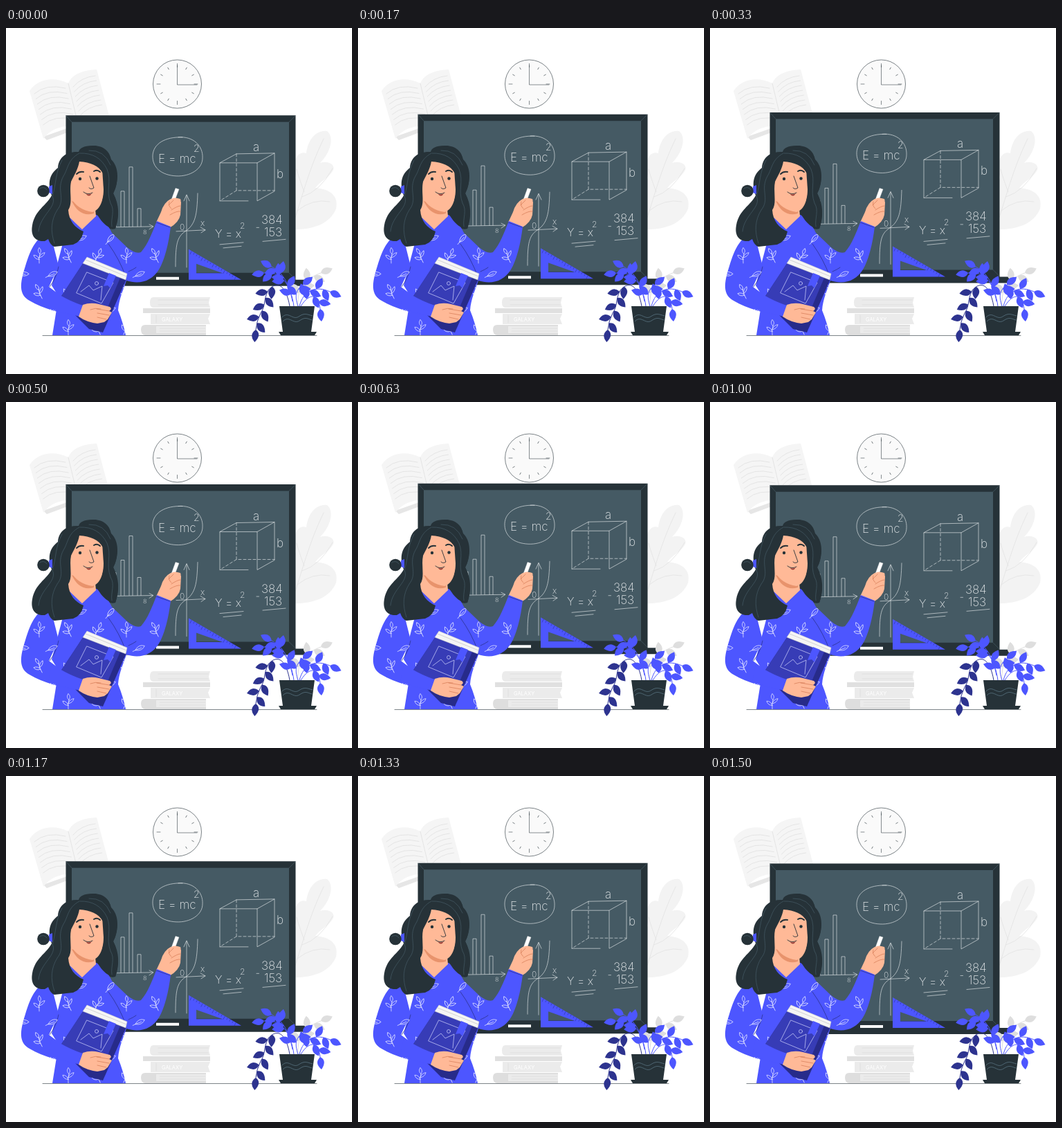
Recreate the animation shown at these times as an HTML page. Size 500 by 500 pixels, loop 1540 ms.

```html
<!DOCTYPE html>
<html lang="en">
<head>
<meta charset="utf-8">
<title>Teacher at the blackboard</title>
<style>
html, body { margin: 0; width: 100%; height: 100%; overflow: hidden; background: #fff; }
svg { display: block; width: 100vw; height: 100vh; }
.line { fill: none; stroke-linecap: round; stroke-linejoin: round; }
.ink { stroke: #263238; }
.chalk { stroke: #e4e8ea; stroke-width: .65; }
.note { font: 200 17px Inter, Roboto, sans-serif; fill: #e4e8ea; }
.small { font-size: 12px; }
.dark { fill: #263238; }
.blue { fill: #4d56ff; }
.skin { fill: #ffb997; }
.crease { stroke: #d9805c; stroke-width: .8; }
</style>
</head>
<body>
<svg viewBox="0 0 500 500">
  <defs>
    <path id="leaf" d="M0 0Q7-11 20 0Q9 11 0 0Z"/>
    <path id="sprig" d="M0 11Q-1 2 1-4M0 5Q-7 5-9-2Q-2-2 0 5M0 2Q7 1 9-6Q2-5 0 2M1-4Q-4-8 0-14Q5-9 1-4"/>
    <path id="bud" d="M-8 3Q-3-7 7-4Q3 5-8 3L-12 5M-8 3L2-1"/>
    <path id="dress" d="M91 272L131 270C143 279 149 287 153 296L175 317Q187 327 195 324C205 313 211 296 218 279L238 287C235 312 229 336 221 349C211 366 193 371 174 365C170 377 163 392 162 408Q169 425 173 444H67L76 388L66 372L85 300Z"/>
    <path id="sleeve" d="M64 296C44 301 36 318 28 344C20 369 18 385 34 394C54 406 80 412 106 417L111 401C96 396 83 391 78 386L62 374L76 344Z"/>
    <clipPath id="cloth"><use href="#dress"/><use href="#sleeve"/></clipPath>
  </defs>

  <!-- wall -->
  <g class="line" stroke="#e3e3e3" stroke-width=".9">
    <path fill="#e6e6e6" stroke="none" d="M54 157L88 145L104 138L149 127L146 133L105 145L59 162Z"/>
    <path fill="#f5f5f5" stroke="none" d="M34 91C46 73 70 70 90 80C96 66 112 61 131 60L149 127C130 124 114 130 105 143C90 139 66 143 54 160Z"/>
    <path d="M90 80L105 143"/>
    <g id="pageLines"></g>
  </g>
  <path fill="#f3f3f3" d="M412 291C416 270 412 240 419 216C413 192 421 177 434 181C436 163 447 147 464 149C475 158 469 180 454 195C465 191 476 197 473 205C468 216 454 221 447 231C461 232 482 238 477 261C468 284 442 292 412 291Z"/>
  <path class="line" stroke="#e2e2e2" stroke-width=".8" d="M414 286C428 245 437 205 459 160M431 237Q423 216 420 204M428 244Q454 236 472 203M421 264Q443 246 468 251"/>
  <circle cx="247.500" cy="81" r="35" fill="#fafafa" class="ink" stroke-width=".6"/>
  <g id="ticks" class="line ink" stroke-width=".55"><path d="M247.500 54V82H276"/></g>

  <g id="board">
    <path class="dark" d="M86.500 126.500H418.500V364H437V373H86.500Z"/>
    <path fill="#455a64" d="M95 136H409V354H95Z"/>
    <path class="line" stroke="#455a64" stroke-width=".7" d="M87 127L95 136M418 127L409 136M418 363L409 354"/>
    <g class="line chalk">
      <path d="M249 158C271 156 285 171 284 188C284 204 266 215 246 214C225 213 211 202 212 184C213 168 229 157 255 158"/>
      <path d="M150 288L212 287M207 284L213 287L207 291"/>
      <g id="bars"></g>
      <path d="M261 346V242M257 250L261 241L265 250M246 294L288 292M281 288L288 292L282 296M245 345C245 313 247 302 259 294C274 284 276 270 277 239"/>
      <path d="M350 250H309V195H363V250L388 236V181L333 182L309 195M363 195L388 181"/>
      <path stroke-dasharray="4 3" d="M333 182V235H388M333 235L309 250"/>
      <path d="M309 313L343 310M314 318L340 315.500M371 308.500L404 305.500M362 288.500H365.500"/>
    </g>
    <g class="note">
      <text x="220" y="195">E = mc</text><text class="small" x="271" y="179" style="font-size:14px">2</text>
      <text x="302" y="303" style="font-size:16px">Y = x</text><text class="small" x="338" y="290">2</text>
      <text x="369" y="283">384</text><text x="373" y="301">153</text>
      <text x="357" y="178">a</text><text x="391" y="217">b</text>
      <text class="small" x="281" y="286">x</text><text class="small" x="251" y="292">0</text>
      <text x="198" y="298" style="font-size:9px">8</text>
    </g>
    <path fill="#fff" d="M217 360H250V364H217Z"/>
    <path class="blue" fill-rule="evenodd" d="M264 320L340 364H264ZM275 341V354.500H313Z"/>
    <g id="rulerMarks" class="line" stroke="#2b3197" stroke-width=".6"></g>
  </g>

  <!-- stacked books -->
  <g fill="#ebebeb">
    <path d="M213 389H295L293 397L295 404H213Q208 404 208 397Q208 389 213 389Z"/>
    <path fill="#e0e0e0" d="M198 405H295V412H198Z"/>
    <path d="M209 413H295L292 420L295 428H209Z"/>
    <path fill="#dedede" d="M201 429H289V444H201Q195 443 195 436Q195 429 201 429Z"/>
    <path fill="#ebebeb" d="M217 431H289V441H217Z"/>
    <path class="line" stroke="#dfdfdf" d="M220 393H292M220 400H292M217 415V426M222 434H288M222 438H288"/>
    <text x="225" y="424" fill="#fff" font-family="Inter, sans-serif" font-size="7.500">GALAXY</text>
  </g>
  <path class="line ink" stroke-width=".6" d="M53 444.500H449"/>

  <g id="plant"></g>
  <path class="dark" d="M395 402H446L441 439H449L446 444H397L394 439H400Z"/>
  <path class="line" stroke="#607d8b" stroke-width=".7" d="M399 418C408 408 414 423 423 417S435 414 443 416M400 424C409 414 415 429 424 423S435 420 442 422"/>

  <!-- teacher -->
  <path class="dark" d="M109 174C130 165 149 174 152 190C164 202 163 222 155 239C164 255 164 274 158 290Q150 293 142 284L120 265L96 230Z"/>
  <path class="skin" d="M217 281L224 266Q228 252 238 247Q244 244 250 247L253 252L252 270Q250 281 236 289Z"/>
  <path fill="#fff" stroke="#ddd" stroke-width=".4" d="M245 231.500L250 233L244 249L239 248Z"/>
  <path class="skin" d="M235 251Q241 244 247 246L252 247Q254 252 250 255L236 260Z"/>
  <path class="line crease" d="M235 256L242 249M239 263Q248 257 252 257M237 270Q247 264 252 265M236 251Q234 257 239 261"/>
  <use href="#dress" class="blue"/>
  <use href="#sleeve" class="blue"/>
  <path class="line" stroke="#2d338f" stroke-width=".8" d="M148 312Q164 334 173 359M76 345Q73 361 63 374M217 281L237 288M177 352Q184 349 188 346"/>
  <g id="print" class="line" stroke="#dfe1ff" stroke-width=".9" clip-path="url(#cloth)"></g>
  <path class="skin" d="M88 240V270L110 291L130 272L128 250Z"/>
  <path fill="#e8936c" d="M95 250Q106 274 127 268L127 262Z"/>
  <path class="skin" d="M108 186C98 200 90 224 93 243C99 257 111 264 125 266C137 262 141 247 141 233L139 204Q126 190 108 186Z"/>
  <circle class="dark" cx="107" cy="218" r="2.200"/><circle class="dark" cx="131.500" cy="217.500" r="2.200"/>
  <path class="line ink" stroke-width="1.900" d="M102 211Q106 207 112 208M127 207Q132 204 136 208"/>
  <path class="line ink" stroke-width=".9" d="M121 214L127 231Q123 234 120 231M112 237Q118 242 125 238"/>
  <path fill="#9a3b35" d="M115 239Q119 242 124 239Q120 246 115 239Z"/>
  <path class="dark" d="M125 170C112 170 106 174 105 179C87 178 76 187 75 202C62 212 60 225 66 242C58 257 42 263 38 285C35 301 43 309 56 308L61 305Q64 314 70 316L97 313Q109 309 112 294C100 289 91 279 90 263C97 253 91 237 94 222C99 212 104 204 106 193C122 194 134 199 140 210L142 234Q140 255 131 268Q143 290 158 290C165 269 161 253 155 239C165 221 160 201 151 190C151 178 139 169 125 170Z"/>
  <path class="blue" d="M62 229L67 227V240L62 238Z"/>
  <circle class="dark" cx="54" cy="235.500" r="8.800"/>
  <path class="line" stroke="#4b626d" stroke-width=".6" d="M106 181C89 190 90 203 83 214C72 234 87 247 74 263C65 278 64 293 70 311M81 191C71 209 73 224 67 243C75 259 49 270 47 294M107 181Q134 180 146 204C153 222 144 234 151 253C158 264 151 275 153 287M120 177Q142 176 151 198M49 232Q55 228 59 234"/>

  <!-- held book -->
  <path fill="#272b8a" d="M112 339L174 363L140 440L120 435L77 392Z"/>
  <path fill="#373cb6" d="M112 339L165 361L138 425L77 392Z"/>
  <path fill="#f5f5f5" stroke="#c7c7c7" stroke-width=".5" d="M117 331L175 355L173 364L111 340Z"/>
  <path class="line" stroke="#bbb" stroke-width=".6" d="M115 335L174 359"/>
  <path class="line" stroke="#d5d7ff" stroke-width=".7" d="M117 353L155 368L138 398L102 383ZM108 381L120 372L126 379L139 373L137 393"/>
  <circle class="line" stroke="#d5d7ff" stroke-width=".7" cx="131" cy="369" r="2.500"/>
  <path class="blue" d="M149 354L159 358L151 376L147 372L141 373Z"/>
  <path class="blue" d="M66 378L78 386Q93 395 111 401L106 417L61 405Z"/>
  <path class="skin" d="M111 400Q122 396 134 399L150 403Q154 406 149 409L153 411L150 416L147 421L142 425L132 427Q116 425 105 417Z"/>
  <path class="line crease" d="M131 406L149 409M132 412L149 415M132 418L145 421M122 407Q129 404 137 406"/>
</svg>
<script>
const LOOP = 1540, LIFT = 9, LEAD = 60;
const $ = id => document.getElementById(id);
const repeat = (n, draw) => Array.from({ length: n }, (_, i) => draw(i)).join('');
const use = (id, x, y, angle) => `<use href="#${id}" transform="translate(${x} ${y}) rotate(${angle}) scale(.9)"/>`;

$('ticks').innerHTML += repeat(12, i =>
  `<path d="M247.5 ${i % 3 ? 53.5 : 51.5}V56.5" transform="rotate(${i * 30} 247.5 81)"/>`);
$('pageLines').innerHTML = repeat(7, i =>
  `<path d="M${41 + i * 2.1} ${95 + i * 7.5}q17-15 45-8M${97 + i * 1.6} ${85 + i * 7}q12-14 32-16"/>`);
$('rulerMarks').innerHTML = repeat(17, i =>
  `<path d="M${268 + i * 4} ${323 + i * 2.31}l${i % 4 ? '-1 2' : '-2 4'}"/>`);
$('bars').innerHTML = [33, 51, 86, 26].map((height, i) =>
  `<path d="M${154 + i * 12} 287v${-height}h5v${height}"/>`).join('');

// Staggered rows of sprigs and buds, clipped to the clothes
$('print').innerHTML = repeat(6, row => repeat(5, col =>
  use(row % 2 ? 'sprig' : 'bud', 48 + col * 42 - (row % 2 ? 0 : 22), 304 + row * 26, (col * 2 + row) % 3 * 25 - 25)));

// Leaves alternate along a stem and the last one continues it
function growStem(color, d, count, start) {
  const group = document.createElementNS('http://www.w3.org/2000/svg', 'g');
  $('plant').append(group);
  group.innerHTML = `<path class="line" stroke="${color}" d="${d}"/>`;
  const stem = group.firstChild, length = stem.getTotalLength();
  group.innerHTML += `<g fill="${color}">` + repeat(count, i => {
    const at = length * (start + (1 - start) * i / (count - 1));
    const p = stem.getPointAtLength(at), q = stem.getPointAtLength(at - 1);
    const heading = Math.atan2(p.y - q.y, p.x - q.x) * 180 / Math.PI;
    const side = i === count - 1 ? 0 : i % 2 ? 55 : -55;
    return use('leaf', p.x, p.y, heading + side);
  }) + '</g>';
}
const DARK = '#2d338f', BRIGHT = '#4d56ff';
growStem('#dedede', 'M422 402C420 374 434 362 455 354', 5, .3);
growStem(DARK, 'M410 402C404 368 390 366 379 379C371 395 376 400 368 412Q362 424 361 436', 8, .4);
growStem(BRIGHT, 'M416 402C412 372 398 350 373 354', 6, .25);
growStem(BRIGHT, 'M414 395C408 365 398 352 384 345', 4, .6);
growStem(BRIGHT, 'M422 402C416 385 420 378 429 371', 3, .5);
growStem(BRIGHT, 'M424 402C430 378 448 372 468 381', 5, .3);
growStem(BRIGHT, 'M426 402C440 380 452 386 454 406', 4, .3);

function draw(now) {
  const phase = (now + LEAD) / LOOP * 2 * Math.PI;
  $('board').setAttribute('transform', `translate(0 ${-LIFT / 2 * (1 - Math.cos(phase))})`);
  requestAnimationFrame(draw);
}
draw(performance.now());
</script>
</body>
</html>
```
